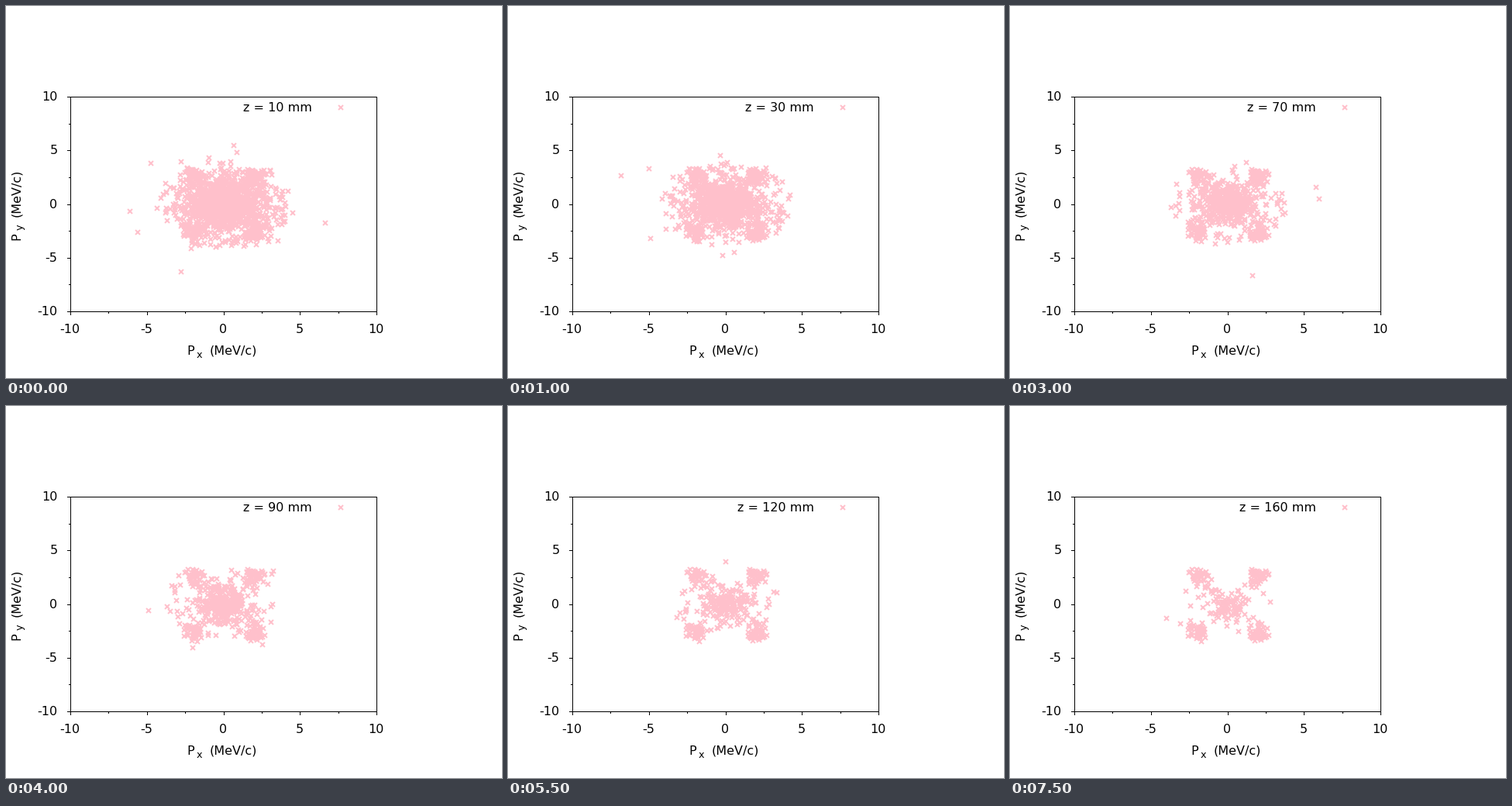
A matplotlib script that plays this animation: 640x480 px, repeating every 8 s.

```python
import numpy as np
import matplotlib.pyplot as plt
from matplotlib.animation import FuncAnimation
from matplotlib.patches import Rectangle

W, H, DPI = 640, 480, 80
LEFT, RIGHT, TOP, BOTTOM = 83.5, 478.5, 117.5, 394.5
FRAMES, INTERVAL = 16, 500
PINK = "#ffc0cb"


def pt(px):
    return px * 72 / DPI


plt.rcParams["font.family"] = "DejaVu Sans"
fig = plt.figure(figsize=(W / DPI, H / DPI), dpi=DPI, facecolor="white")
ax = fig.add_axes([0, 0, 1, 1])
ax.set_xlim(0, W)
ax.set_ylim(H, 0)
ax.axis("off")


def to_px(p):
    x = LEFT + (p[:, 0] + 10) / 20 * (RIGHT - LEFT)
    y = BOTTOM - (p[:, 1] + 10) / 20 * (BOTTOM - TOP)
    return np.floor(x) + 0.5, np.floor(y) + 0.5


def label(x, y, s, ha="left", size=16, rot=0):
    return ax.text(x, y, s, ha=ha, va="baseline", fontsize=pt(size),
                   rotation=rot, rotation_mode="anchor", zorder=5)


def line(xs, ys):
    ax.plot(xs, ys, color="black", lw=pt(1), solid_capstyle="butt",
            snap=False, zorder=4)


def draw_axes():
    ax.add_patch(Rectangle((LEFT, TOP), RIGHT - LEFT, BOTTOM - TOP, fill=False,
                           ec="black", lw=pt(1), snap=False, zorder=4))
    for i in range(9):
        x = np.floor(LEFT + i * (RIGHT - LEFT) / 8) + 0.5
        y = np.floor(BOTTOM - i * (BOTTOM - TOP) / 8) + 0.5
        size = 2.5 if i % 2 else 4.5
        line([x, x], [BOTTOM, BOTTOM + size])
        line([LEFT - size, LEFT], [y, y])
        if i % 2 == 0:
            s = str(round(-10 + 2.5 * i))
            label(x - 1, 422, s, "center")
            label(66.5, y + 4.5, s, "right")
    for step, s, size, drop in ((0, "P", 16, 0), (13, "{}", 12.8, 4),
                                (29.5, "(MeV/c)", 16, 0)):
        label(233 + step, 450 + drop, s.format("x"), size=size)
        label(18 + drop, 302 - step, s.format("y"), size=size, rot=90)


rng = np.random.default_rng(11)

# Beam core: particles circle the centre and are lost one by one
CORE = 1700
a, b = rng.normal(size=(2, CORE, 2))
spin = rng.uniform(0.05, 0.2, (CORE, 1))
grow = rng.uniform(0.4, 1.4, (CORE, 1))

# Four corner groups that stay in place
CORNER, KEPT = 60, 42
signs = np.array([(-1, 1), (1, 1), (-1, -1), (1, -1)])
corners = rng.triangular((1.2, 1.4), (1.95, 2.8), (2.75, 3.5),
                         (4, CORNER, 2)) * signs[:, None]


def core(z):
    n = int(CORE * np.exp(-z / 58))
    turn = spin[:n] * z
    p = (a[:n] * np.cos(turn) + b[:n] * np.sin(turn)) * grow[:n]
    p *= (1.68 - 0.004 * z, 1.6 - 0.0035 * z)
    inside = np.hypot(p[:, 0], p[:, 1] * 1.12) < 4.7 - 0.01 * z
    return p[inside]


def halo(z):
    r = np.random.default_rng(z)
    n = int(70 * np.exp(-z / 55))
    ang = r.uniform(0, 2 * np.pi, n)
    rad = np.minimum(3 + r.exponential(1.3 - 0.004 * z, n), 7.5)
    return np.column_stack([rad * np.cos(ang), 0.9 * rad * np.sin(ang)])


def cloud(z):
    kept = KEPT + int((CORNER - KEPT) * np.exp(-z / 60))
    return np.vstack([core(z), corners[:, :kept].reshape(-1, 2), halo(z)])


draw_axes()
cross = dict(ls="none", marker="x", ms=pt(5.4), mew=pt(2), color=PINK)
dots, = ax.plot([], [], zorder=2, **cross)
ax.plot([432], [131], zorder=2, **cross)
key = label(394.5, 136, "", "right")


def update(i):
    z = 10 * (i + 1)
    dots.set_data(*to_px(cloud(z)))
    key.set_text(f"z = {z} mm")
    return dots, key


anim = FuncAnimation(fig, update, frames=FRAMES, interval=INTERVAL,
                     repeat=True, repeat_delay=0, blit=False)
plt.show()
```
